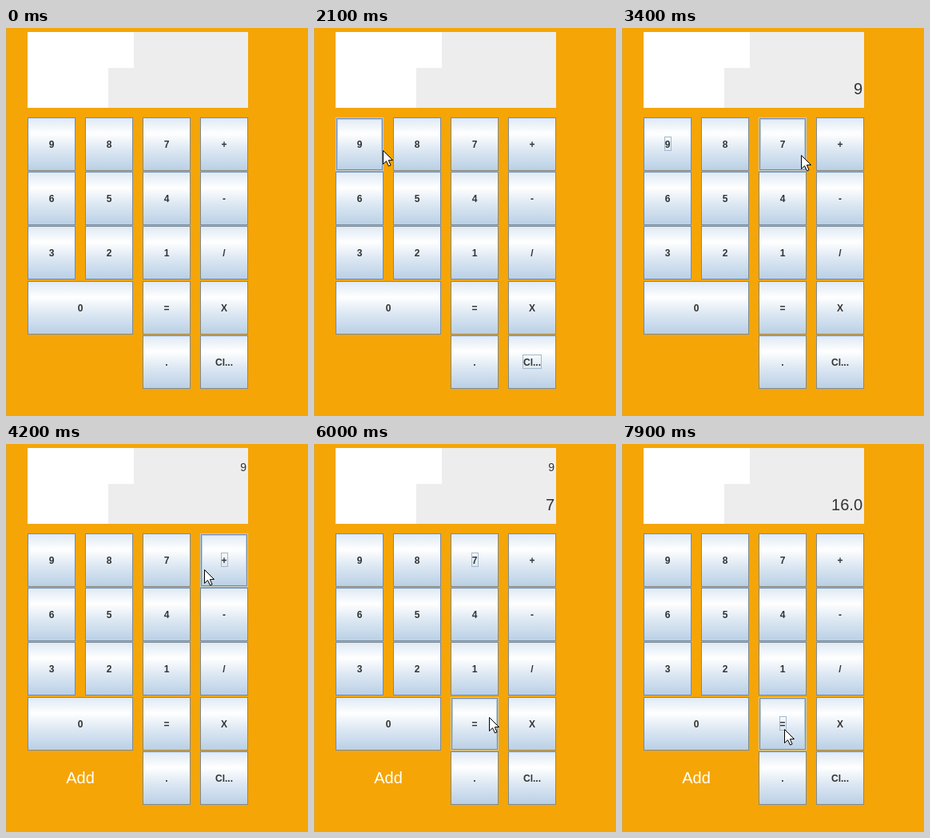
Animation, 378 px wide and 486 px high, one loop 8000 ms. Source, as an HTML page with a canvas:

```html
<!DOCTYPE html>
<html lang="en">
<head>
<meta charset="utf-8">
<title>Calculator</title>
<style>
  html, body { margin: 0; width: 100%; height: 100%; overflow: hidden; background: #f5a506; }
  canvas { display: block; }
</style>
</head>
<body>
<canvas id="stage" width="378" height="486"></canvas>
<script>
const ctx = document.getElementById('stage').getContext('2d');
const LOOP = 8000, STEP = 100;
const FONT = '"Liberation Sans", Arial, sans-serif';

const columns = [27, 99, 171, 243];
const rows = [112, 180, 248, 317, 385];
const layout = [
  ['9', '8', '7', '+'],
  ['6', '5', '4', '-'],
  ['3', '2', '1', '/'],
  ['0', '', '=', 'X'],
  ['', '', '.', 'Cl...']
];
const buttons = layout.flatMap((labels, r) => labels.map((label, c) => ({
  label, x: columns[c], y: rows[r], w: label === '0' ? 132 : 60, h: 67
}))).filter(b => b.label);

// Pointer stops: time, x, y
const path = [
  [1600, 138, 214], [2100, 86, 153], [2300, 70, 157], [2700, 70, 157],
  [3400, 224, 159], [3700, 250, 157], [4200, 248, 157],
  [4600, 212, 156], [5600, 212, 156], [6000, 219, 342],
  [6400, 202, 355], [7100, 202, 355], [7900, 203, 357]
];

// Mouse presses: focus moves on press, the action fires on release
const presses = [
  { down: 2400, up: 2600, label: '9' },
  { down: 3800, up: 4000, label: '+' },
  { down: 5000, up: 5100, label: '7' },
  { down: 6500, up: 6600, label: '=' }
];

// Display contents over time
const readings = [
  { at: 0, upper: '', lower: '' },
  { at: 2600, upper: '', lower: '9' },
  { at: 4000, upper: '9', lower: '' },
  { at: 5100, upper: '9', lower: '7' },
  { at: 6600, upper: '', lower: '16.0' }
];

const ease = u => u * u * (3 - 2 * u);

function pointerAt(t) {
  if (t < path[0][0]) return null;
  const i = path.findIndex(p => p[0] > t);
  if (i < 0) return path[path.length - 1].slice(1);
  const [t0, x0, y0] = path[i - 1], [t1, x1, y1] = path[i];
  const u = ease((t - t0) / (t1 - t0));
  return [Math.round(x0 + (x1 - x0) * u), Math.round(y0 + (y1 - y0) * u)];
}

function focusAt(t) {
  const last = presses.filter(p => p.down <= t).pop();
  return last ? last.label : t >= 1000 ? 'Cl...' : '';
}

function rect(x, y, w, h, color) {
  ctx.fillStyle = color;
  ctx.fillRect(x, y, w, h);
}

function outline(x, y, w, h, color) {
  ctx.strokeStyle = color;
  ctx.lineWidth = 1;
  ctx.strokeRect(x + 0.5, y + 0.5, w - 1, h - 1);
}

function text(str, x, y, font, color, align) {
  ctx.font = `${font} ${FONT}`;
  ctx.fillStyle = color;
  ctx.textAlign = align;
  ctx.fillText(str, x, y);
}

function buttonFill({ y, h }) {
  const g = ctx.createLinearGradient(0, y, 0, y + h);
  g.addColorStop(0, '#dde8f3');
  g.addColorStop(0.3, '#ffffff');
  g.addColorStop(0.6, '#dde8f3');
  g.addColorStop(1, '#b8cfe5');
  return g;
}

function drawButton(b, hovered, pressed, focused) {
  const { x, y, w, h, label } = b;
  const cx = x + w / 2;
  rect(x, y, w, h, pressed ? '#b8cfe5' : buttonFill(b));
  if (pressed) {
    outline(x, y, w, h, '#7a8a99');
    outline(x + 1, y + 1, w - 1, h - 1, '#7a8a99');
  } else if (hovered) {
    outline(x, y, w, h, '#b8cfe5');
    outline(x + 2, y + 2, w - 4, h - 4, '#b8cfe5');
    outline(x + 1, y + 1, w - 2, h - 2, '#7a8a99');
  } else {
    outline(x, y, w, h, '#7a8a99');
  }
  text(label, cx, y + 38, 'bold 12px', '#333', 'center');
  if (focused) {
    const tw = Math.round(ctx.measureText(label).width);
    outline(Math.round(cx - tw / 2) - 1, y + 24, tw + 2, 18, '#a3b8cc');
  }
}

function drawDisplay(t) {
  const { upper, lower } = readings.filter(r => r.at <= t).pop();
  rect(27, 5, 276, 95, '#ededed');
  rect(27, 5, 133, 45, '#fff');
  rect(27, 50, 101, 50, '#fff');
  text(upper, 301, 34, '14px', '#333', 'right');
  text(lower, 301, 83, '20px', '#333', 'right');
}

function drawPointer([x, y]) {
  const shape = [[0, 0], [0, 17], [4, 13.2], [7, 19.5], [9.6, 18.4], [6.8, 12.2], [12, 12]];
  ctx.beginPath();
  shape.forEach(([dx, dy]) => ctx.lineTo(x + dx + 0.5, y + dy + 0.5));
  ctx.closePath();
  ctx.fillStyle = '#fff';
  ctx.fill();
  ctx.strokeStyle = '#000';
  ctx.lineWidth = 1;
  ctx.stroke();
}

function draw(t) {
  const pointer = pointerAt(t);
  const focus = focusAt(t);
  const press = presses.find(p => t >= p.down && t < p.up);
  rect(0, 0, 378, 486, '#f5a506');
  rect(0, 0, 1, 486, '#dfa63a');
  drawDisplay(t);
  for (const b of buttons) {
    const hovered = pointer && pointer[0] >= b.x && pointer[0] < b.x + b.w &&
      pointer[1] >= b.y && pointer[1] < b.y + b.h;
    drawButton(b, hovered, press && press.label === b.label, focus === b.label);
  }
  if (t >= 4000) text('Add', 93, 425, '20px', '#fff', 'center');
  if (pointer) drawPointer(pointer);
}

function tick() {
  const t = performance.now() % LOOP;
  draw(Math.floor(t / STEP) * STEP);
  requestAnimationFrame(tick);
}
tick();
</script>
</body>
</html>
```
